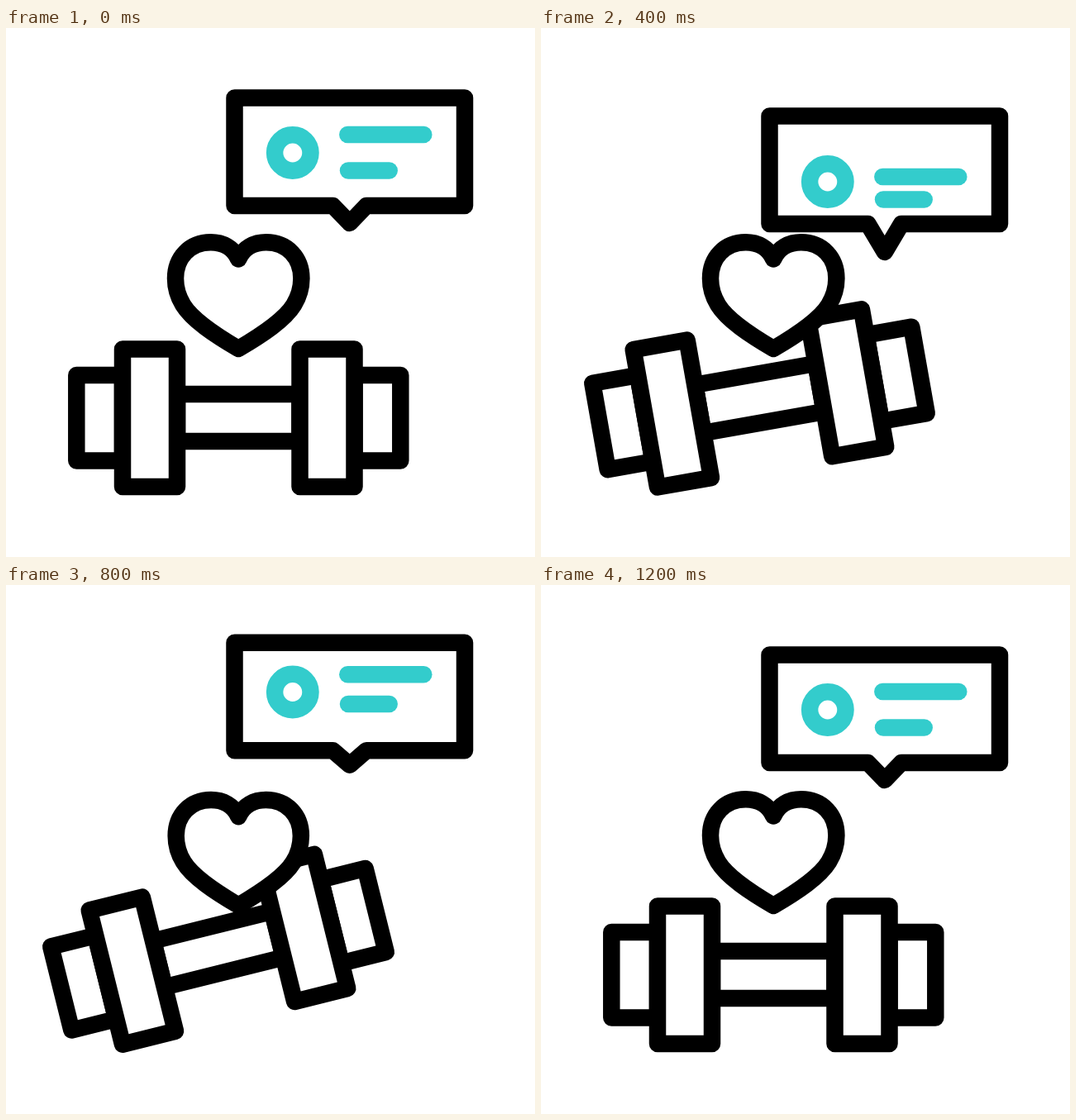
Animation of 640 by 640 pixels, one loop 1480 ms. Source, as an HTML page with a canvas:

```html
<!DOCTYPE html>
<html lang="en">
<head>
<meta charset="utf-8">
<title>Workout chat</title>
<style>
html, body { margin: 0; width: 100%; height: 100%; overflow: hidden; background: #fff; }
canvas { display: block; width: 100%; height: 100%; }
</style>
</head>
<body>
<canvas id="stage" width="640" height="640"></canvas>
<script>
const ctx = document.getElementById('stage').getContext('2d');
const LOOP = 1480, STEP = 40, START = 80, LAST = 28;
const INK = '#000', TEAL = '#33cccc', WIDTH = 20.5;

// Gentle ease in and out: cubic bezier (1/6, 0, 5/6, 1)
function ease(x) {
  let lo = 0, hi = 1;
  for (let i = 0; i < 24; i++) {
    const u = (lo + hi) / 2, v = 1 - u;
    if (0.5 * u * v * v + 2.5 * u * u * v + u * u * u < x) lo = u; else hi = u;
  }
  return lo * lo * (3 - 2 * lo);
}

// Value at step k of a track of [step, value] keys
function track(k, keys) {
  if (k <= keys[0][0]) return keys[0][1];
  for (let i = 1; i < keys.length; i++) {
    const [k0, v0] = keys[i - 1], [k1, v1] = keys[i];
    if (k <= k1) return v0 + (v1 - v0) * ease((k - k0) / (k1 - k0));
  }
  return keys[keys.length - 1][1];
}

const bounce = (k, down, up) => track(k, [[0, 0], [8, down], [15, up], [21, 0]]);

function poly(points, closed, fill) {
  ctx.beginPath();
  points.forEach(([x, y]) => ctx.lineTo(x, y));
  if (closed) ctx.closePath();
  if (fill) ctx.fill();
  ctx.stroke();
}

const box = (x0, y0, x1, y1) =>
  poly([[x0, y0], [x1, y0], [x1, y1], [x0, y1]], true, true);

function dumbbell(k) {
  const angle = track(k, [[0, 0], [16, 20], [22, 0]]);
  const grow = track(k, [[0, 0], [16, 5], [22, -9.5], [28, 0]]);
  ctx.save();
  ctx.translate(141, 555 + angle / 20);
  ctx.rotate(-angle * Math.PI / 180);
  ctx.translate(-141, -555);
  box(85.3, 420 - grow, 141, 523.5);
  box(421.5, 420 - grow, 477.3, 523.5);
  box(207, 443 - grow * 0.8, 355.5, 500);
  box(141, 388.5 - grow, 207, 555);
  box(355.5, 388.5 - grow, 421.5, 555);
  ctx.restore();
}

function heart(k) {
  const s = track(k, [[8, 1], [12, 0.932], [16, 1.052], [20, 0.932], [24, 1]]);
  ctx.save();
  ctx.translate(281.2 + Math.abs(s - 1) * 8, 355);
  ctx.scale(s, s);
  ctx.beginPath();
  for (const side of [-1, 1]) {
    ctx.save();
    ctx.scale(side, 1);
    ctx.moveTo(0, -75.5);
    ctx.bezierCurveTo(6, -89, 19, -95.7, 33.5, -95.7);
    ctx.bezierCurveTo(59, -95.7, 76.2, -77, 76.2, -52);
    ctx.bezierCurveTo(76.2, -41, 72.5, -29, 67, -20);
    ctx.bezierCurveTo(56, -2, 29, 16, 0, 33);
    ctx.restore();
  }
  ctx.restore();
  ctx.fill();
  ctx.stroke();
}

function bubble(k) {
  const y = bounce(k, 22, -29.5);
  const tip = 236 + bounce(k, 35, -36.5);
  const top = 84.5 + y, base = 215 + y;
  poly([[276.5, top], [555, top], [555, base], [436, base], [415.8, tip],
    [395.5, base], [276.5, base]], true, true);

  ctx.strokeStyle = TEAL;
  ctx.beginPath();
  ctx.arc(346.8, 151 + bounce(k, 35, -43), 21.7, 0, Math.PI * 2);
  ctx.stroke();
  const y1 = 129 + bounce(k, 51, -41.5), y2 = 172.5 + bounce(k, 35, -57);
  poly([[413.3, y1], [505.3, y1]]);
  poly([[414, y2], [463.7, y2]]);
}

function draw(t) {
  const k = Math.max(0, Math.min(LAST, Math.floor((t - START) / STEP)));
  ctx.fillStyle = '#fff';
  ctx.fillRect(0, 0, 640, 640);
  ctx.lineWidth = WIDTH;
  ctx.lineJoin = ctx.lineCap = 'round';
  ctx.strokeStyle = INK;
  dumbbell(k);
  heart(k);
  bubble(k);
}

const begin = performance.now();
function tick() {
  draw((performance.now() - begin) % LOOP);
  requestAnimationFrame(tick);
}
tick();
</script>
</body>
</html>
```
